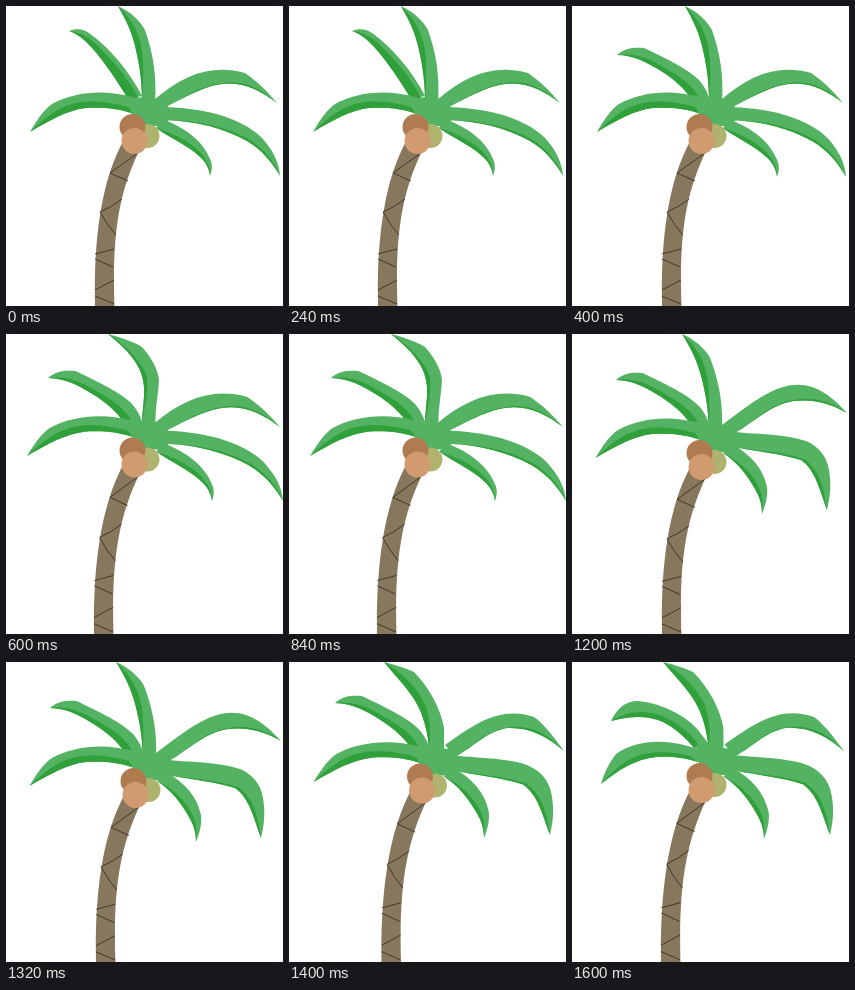
Recreate the animation shown at these times as an HTML page. Size 277x300 px, loop 1800 ms.

```html
<!DOCTYPE html>
<html lang="en">
<head>
<meta charset="utf-8">
<title>Swaying palm</title>
<style>
  html, body { margin: 0; width: 100%; height: 100%; overflow: hidden; background: #fff; }
  svg { display: block; width: 277px; height: 300px; }
</style>
</head>
<body>
<svg id="stage" viewBox="0 0 277 300"></svg>
<script>
const LIGHT = '#53b362', DARK = '#30a03a';
const LOOP = 1800;
const CROWN = [142, 100];

// Each pose: end time, crown shift, trunk foot shift, then [shape, tip x, tip y] per frond.
const poses = [
  { until: 400, crown: [0, 0], foot: 0, fronds: [
    ['top', 112, 0], ['upLeftHigh', 63, 25], ['left', 24, 126], ['upRight', 271, 97], ['right', 274, 170], ['low', 204, 170]] },
  { until: 600, crown: [1, 0], foot: 1, fronds: [
    ['top', 113, 0], ['upLeft', 45, 49], ['left', 25, 126], ['upRight', 271, 97], ['right', 274, 171], ['low', 205, 171]] },
  { until: 1000, crown: [0, -4.5], foot: -1, fronds: [
    ['topBent', 102, 0], ['upLeft', 42, 44], ['left', 21, 122], ['upRight', 274, 93], ['right', 277, 167], ['low', 206, 167]] },
  { until: 1200, crown: [1, 1.5], foot: 1, fronds: [
    ['top', 120, 0], ['upLeft', 46, 51], ['left', 25.5, 127], ['upRightHigh', 273, 84], ['right', 273, 171], ['low', 204, 171]] },
  { until: 1400, crown: [1, -2], foot: 1, fronds: [
    ['top', 110, 0], ['upLeft', 44, 46], ['left', 23.5, 124], ['upRightHigh', 275, 79], ['rightBent', 255, 176], ['lowBent', 190, 180]] },
  { until: 1600, crown: [4.5, -6.5], foot: 3.5, fronds: [
    ['topLean', 95, 0], ['upLeft', 46, 41], ['left', 24.5, 120], ['upRightBent', 275, 89], ['rightBent', 261, 173], ['lowBent', 195, 176]] },
  { until: 1800, crown: [1, -7], foot: 0, fronds: [
    ['topLean', 91, 0], ['upLeftBent', 39, 59], ['leftBent', 29, 122], ['upRightBent', 272, 89], ['rightBent', 258, 173], ['lowBent', 192, 177]] }
];

// Frond shapes: the pose they are drawn for, outer edge from the tip, root corner,
// then inner edge and rib from the root back to the tip.
const shapes = {
  top: { home: 0, outer: 'C125,6 134,15 139,24 C147,47 151,70 149,97', root: '136,97',
    inner: 'C136,76 134,62 130,44 C126,26 120,14 112,0', rib: 'C137,80 139,55 134,35 C129,18 120,8 112,0' },
  topBent: { home: 2, outer: 'C120,5 130,9 136,13 C144,22 152,34 153,46 C152,64 148,80 150,95', root: '136,92',
    inner: 'C136,75 140,60 137,46 C134,30 122,16 102,0', rib: 'C138,75 145,50 139,38 C134,26 116,8 102,0' },
  topLean: { home: 5, outer: 'C108,3 118,7 125,10 C141,26 152,48 155,66 L155,95', root: '140,90',
    inner: 'C140,76 136,59 130,46 C122,29 107,15 95,0', rib: 'C142,75 142,58 136,42 C126,22 110,9 95,0' },
  upLeftHigh: { home: 0, outer: 'C70,22 78,23 83,27 C104,42 124,66 136,90', root: '122,93',
    inner: 'C112,76 100,58 87,43 C78,33 72,28 63,25', rib: 'L132,92 C120,68 104,52 90,38 C80,29 72,26 63,25' },
  upLeft: { home: 1, outer: 'C53,42 62,41 72,42 C95,53 116,63 127,74 C132,80 136,86 138,96', root: '120,94',
    inner: 'C113,83 102,73 89,65 C76,57 62,49 45,49', rib: 'L126,90 C119,78 107,70 96,64 C82,55 66,46 45,49' },
  upLeftBent: { home: 6, outer: 'C46,45 54,39 66,39 C94,42 116,56 126,68 C132,76 138,82 142,92', root: '122,86',
    inner: 'C114,76 103,66 91,60 C77,54 62,53 39,59', rib: 'L126,82 C116,68 102,59 90,54 C74,48 56,48 39,59' },
  left: { home: 0, outer: 'C32,112 38,104 46,98 C70,85 100,83 130,92', root: '128,108',
    inner: 'C112,102 96,101 80,102 C62,104 44,114 24,126', rib: 'L122,101 C106,96 86,94 70,97 C52,101 40,111 24,126' },
  leftBent: { home: 6, outer: 'C33,108 38,100 44,92 C66,77 96,76 128,88', root: '126,100',
    inner: 'C112,95 96,94 84,95 C64,97 46,108 29,122', rib: 'L118,94 C104,90 84,89 72,92 C54,96 42,108 29,122' },
  upRight: { home: 0, outer: 'C262,86 252,76 239,67 C206,58 178,68 148,94', root: '160,101',
    inner: 'C184,88 200,80 216,78 C236,75 254,84 271,97', rib: 'C184,87 200,79 214,77.5 C238,72 256,84 271,97' },
  upRightHigh: { home: 4, outer: 'C264,67 254,58 240,53 C212,44 188,62 150,91', root: '162,100',
    inner: 'C184,86 200,70 222,67 C240,65 256,68 275,79', rib: 'C184,85 200,69 222,66 C236,63 256,65 275,79' },
  upRightBent: { home: 5, outer: 'C264,74 255,62 245,55 C212,44 188,60 156,83', root: '166,95',
    inner: 'C186,84 196,70 218,66 C240,65 258,74 275,89', rib: 'C186,83 196,69 218,65.5 C240,62 258,71 275,89' },
  right: { home: 0, outer: 'C273,156 267,144 255,131 C234,111 196,101 152,101', root: '160,114',
    inner: 'C190,115 218,122 241,135 C256,144 266,156 274,170', rib: 'C192,114 222,121 244,134 C259,144 268,156 274,170' },
  rightBent: { home: 4, outer: 'C259,160 259,148 257,136 C255,122 246,112 234,107 C210,99 186,101 154,97', root: '160,113',
    inner: 'C190,118 210,120 229,126 C243,136 247,153 255,176', rib: 'C190,117 212,118 232,125 C249,137 252,156 255,176' },
  low: { home: 0, outer: 'C207,163 206,157 204,153 C197,135 180,122 156,113', root: '150,122',
    inner: 'C166,133 181,139 193,150 C200,156 203,162 204,170', rib: 'C170,128 189,138 198,151 C203,158 204,164 204,170' },
  lowBent: { home: 4, outer: 'C194,170 196,162 195,153 C191,134 179,121 160,110', root: '151,119',
    inner: 'C166,128 177,144 183,155 C188,164 190,170 190,180', rib: 'C169,127 182,142 187,154 C191,163 191,170 190,180' }
};

const path = (d, attrs) => `<path d="${d}" ${attrs}/>`;
const nut = (x, y, r, fill) => `<circle cx="${x}" cy="${y}" r="${r}" fill="${fill}"/>`;
const group = (transform, body) => `<g transform="${transform}">${body}</g>`;
const crownOf = pose => CROWN.map((c, i) => c + pose.crown[i]);

// Moves the root by the crown's shift and blends linearly towards the tip's shift.
function bend(root, tip, newRoot, newTip) {
  const [ax, ay] = [tip[0] - root[0], tip[1] - root[1]];
  const length2 = ax * ax + ay * ay;
  const [u, v] = [ax / length2, ay / length2];
  const [sx, sy] = [newRoot[0] - root[0], newRoot[1] - root[1]];
  const [dx, dy] = [newTip[0] - tip[0] - sx, newTip[1] - tip[1] - sy];
  const along = u * root[0] + v * root[1];
  return `matrix(${[1 + dx * u, dy * u, dx * v, 1 + dy * v, sx - dx * along, sy - dy * along]})`;
}

function frond(pose, [name, ...tip]) {
  const { home, outer, root, inner, rib } = shapes[name];
  const homePose = poses[home];
  const homeTip = homePose.fronds.find(f => f[0] === name).slice(1);
  const transform = bend(crownOf(homePose), homeTip, crownOf(pose), tip);
  return group(transform,
    path(`M${homeTip} ${outer} L${root} ${inner}Z`, `fill="${LIGHT}"`) +
    path(`M${root} ${inner}Z M${root} ${rib}Z`, `fill="${DARK}" fill-rule="evenodd"`));
}

function trunk({ crown, foot }) {
  return group(bend([100, 300], [100, 135], [100 + foot, 300], [100 + crown[0], 135 + crown[1]]),
    path('M89,302 C88,250 91,180 119,132 L134,143 C112,188 106,230 108.5,302Z', 'fill="#87775c"') +
    path('M132,147 L104,167 L122,175 M116,193 Q106,201 94,206 Q101,219 110,229 ' +
      'M108,243 L89,248 M89,253 L107,261 M108,274 L89,284 M89,290 L108,298',
      'fill="none" stroke="#30291f" stroke-width="0.8"'));
}

function draw(pose) {
  return trunk(pose) +
    pose.fronds.map(f => frond(pose, f)).join('') +
    group(`translate(${pose.crown})`,
      path('M124,93 L136,91 L150,93 L161,94 L163,114 L157,120 L140,120 L125,107Z', `fill="${LIGHT}"`) +
      nut(141.5, 130, 12, '#b0b36d') + nut(126.5, 121, 13, '#b17b51') + nut(128.5, 135, 13, '#d19b6f'));
}

const stage = document.getElementById('stage');
const scenes = poses.map(draw);
let shown = -1;

function tick() {
  const time = performance.now() % LOOP;
  const index = poses.findIndex(pose => time < pose.until);
  if (index !== shown) stage.innerHTML = scenes[shown = index];
  requestAnimationFrame(tick);
}
tick();
</script>
</body>
</html>
```
